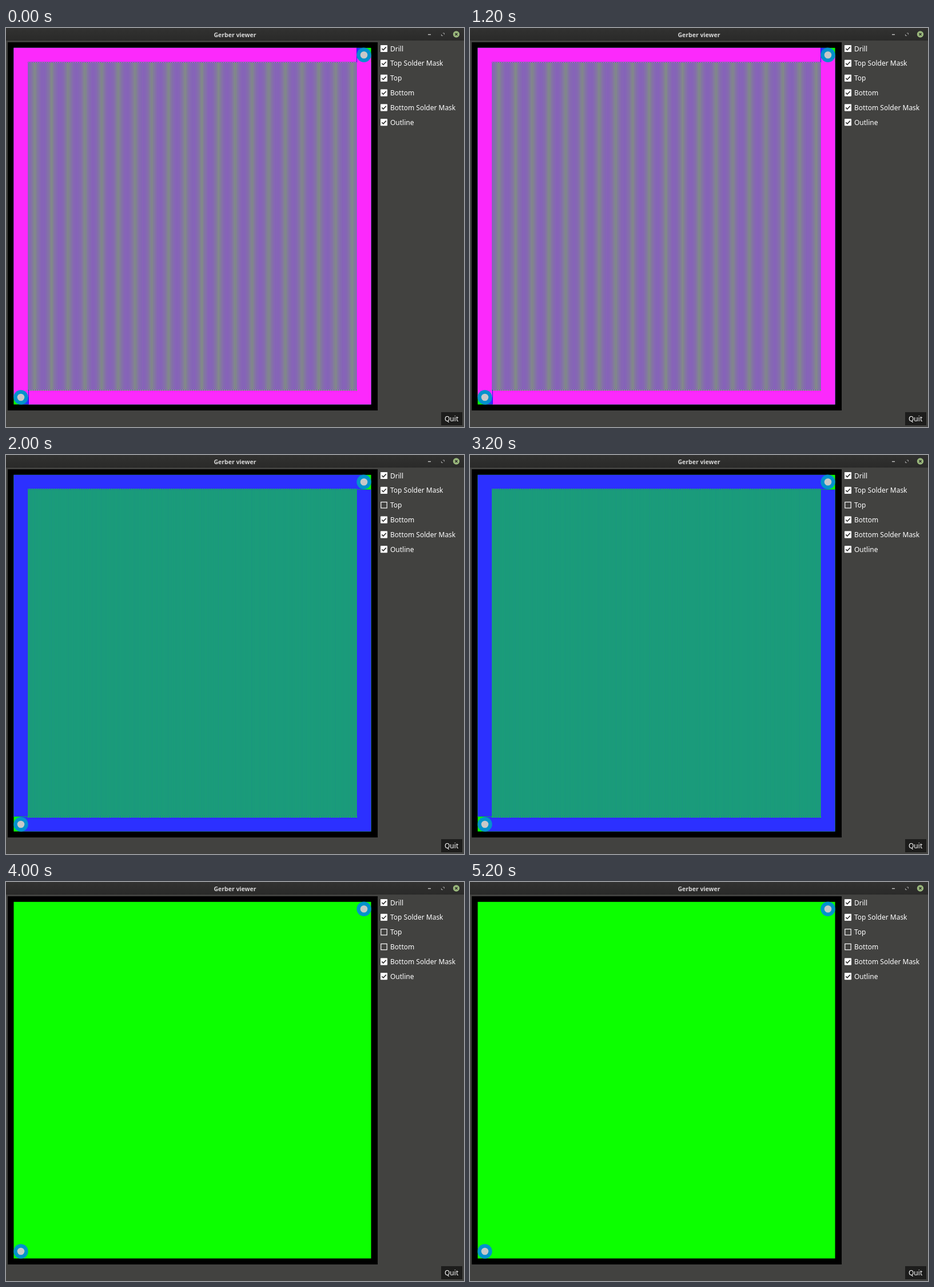
Write an HTML page that moves like this. It is 801 px wide and 699 px high and loops after 6 s.

```html
<!DOCTYPE html>
<html lang="en">
<head>
<meta charset="utf-8">
<title>Gerber viewer</title>
<style>
  html, body { margin: 0; height: 100%; overflow: hidden; background: #424240; }
  svg { display: block; }
  text { font: 12px "Noto Sans", sans-serif; fill: #fff; }
  .title { font-weight: 700; font-size: 10.5px; fill: #d6d6d6; text-anchor: middle; }
</style>
</head>
<body>
<svg width="801" height="699" viewBox="0 0 801 699">
  <defs>
    <linearGradient id="bar" x2="0" y2="1">
      <stop stop-color="#323231"/><stop offset="1" stop-color="#2a2a29"/>
    </linearGradient>
    <g id="pad"><circle r="12.7" fill="#0392cc"/><circle r="6.3" fill="#c8c8c8"/></g>
    <path id="coil" fill="none" stroke-width="0.93"/>
  </defs>
  <rect width="801" height="699" fill="#424240"/>
  <rect width="801" height="22" fill="url(#bar)"/>
  <text class="title" x="400.5" y="15.5">Gerber viewer</text>
  <path d="M738 11.5h5" stroke="#c8c8c8" stroke-width="1.4"/>
  <path d="M764 9h2.5v2.5M764 13.5h-2.5v-2.5" fill="none" stroke="#a5a5a5"/>
  <circle cx="787.5" cy="11" r="5.7" fill="#9ab87c"/>
  <path d="M785.5 9l4 4m0-4l-4 4" stroke="#2b2b2a" stroke-width="1.3"/>

  <rect x="3" y="25" width="647" height="645"/>
  <rect x="13.5" y="34.8" width="625" height="624.7" fill="#0cff00"/>
  <g id="bottom">
    <path fill="#2c30ff" fill-rule="evenodd"
      d="M13.5 34.8H626V60.5H638.5V659.5H26V633.5H13.5z M38 59.5H614V635H38z"/>
    <path d="M614 60.5h24.5M13.5 633.5H38" stroke="#0a9a70"/>
    <use href="#coil" stroke="#2c30ff"/>
  </g>
  <g id="top">
    <path fill="#fc29fc" fill-rule="evenodd"
      d="M13.5 34.8H613V47.5H638.5V659.5H39.5V647H13.5z M38 59.5H614V635H38z"/>
    <path d="M613.5 35V60M39.5 634V659" stroke="#2a10f0"/>
    <use href="#coil" stroke="#fc29fc"/>
  </g>
  <use href="#pad" x="626" y="47.3"/>
  <use href="#pad" x="26" y="647"/>

  <g id="layers"></g>
  <rect x="761" y="673" width="37" height="23" fill="#1d1d1c"/>
  <text x="767" y="689">Quit</text>
</svg>
<script>
const $ = id => document.getElementById(id);
const add = (parent, name, attrs) => {
  const el = document.createElementNS("http://www.w3.org/2000/svg", name);
  for (const key in attrs) el.setAttribute(key, attrs[key]);
  return parent.appendChild(el);
};

// One meandering trace; its pitch beats against the pixel grid
const LEFT = 38.9, TOP = 60.5, BOTTOM = 634, PITCH = 1.9338, LINES = 298;
let coil = `M${LEFT} ${BOTTOM}`;
for (let i = 0; i < LINES; i++) {
  coil += `H${(LEFT + i * PITCH).toFixed(3)}V${i % 2 ? BOTTOM : TOP}`;
}
$("coil").setAttribute("d", coil);

const names = ["Drill", "Top Solder Mask", "Top", "Bottom", "Bottom Solder Mask", "Outline"];
const ticks = names.map((name, i) => {
  const row = add($("layers"), "g", { transform: `translate(655 ${30 + i * 25.85})` });
  add(row, "rect", { x: 0.8, y: 0.8, width: 10.4, height: 10.4, fill: "none", stroke: "#fff", "stroke-width": 1.2 });
  const tick = add(row, "g", {});
  add(tick, "rect", { width: 12, height: 12, rx: 1, fill: "#fff" });
  add(tick, "path", { d: "M2.3 6L4.8 8.6L9.8 3.4", fill: "none", stroke: "#30302f", "stroke-width": 1.6 });
  add(row, "text", { x: 17, y: 10.5 }).textContent = name;
  return tick;
});

const show = (el, on) => el.setAttribute("visibility", on ? "visible" : "hidden");

function draw(now) {
  const step = Math.floor(now % 6000 / 2000);
  const topOn = step === 0, bottomOn = step < 2;
  show($("top"), topOn);
  show($("bottom"), bottomOn);
  show(ticks[2], topOn);
  show(ticks[3], bottomOn);
  requestAnimationFrame(draw);
}
draw(performance.now());
</script>
</body>
</html>
```
